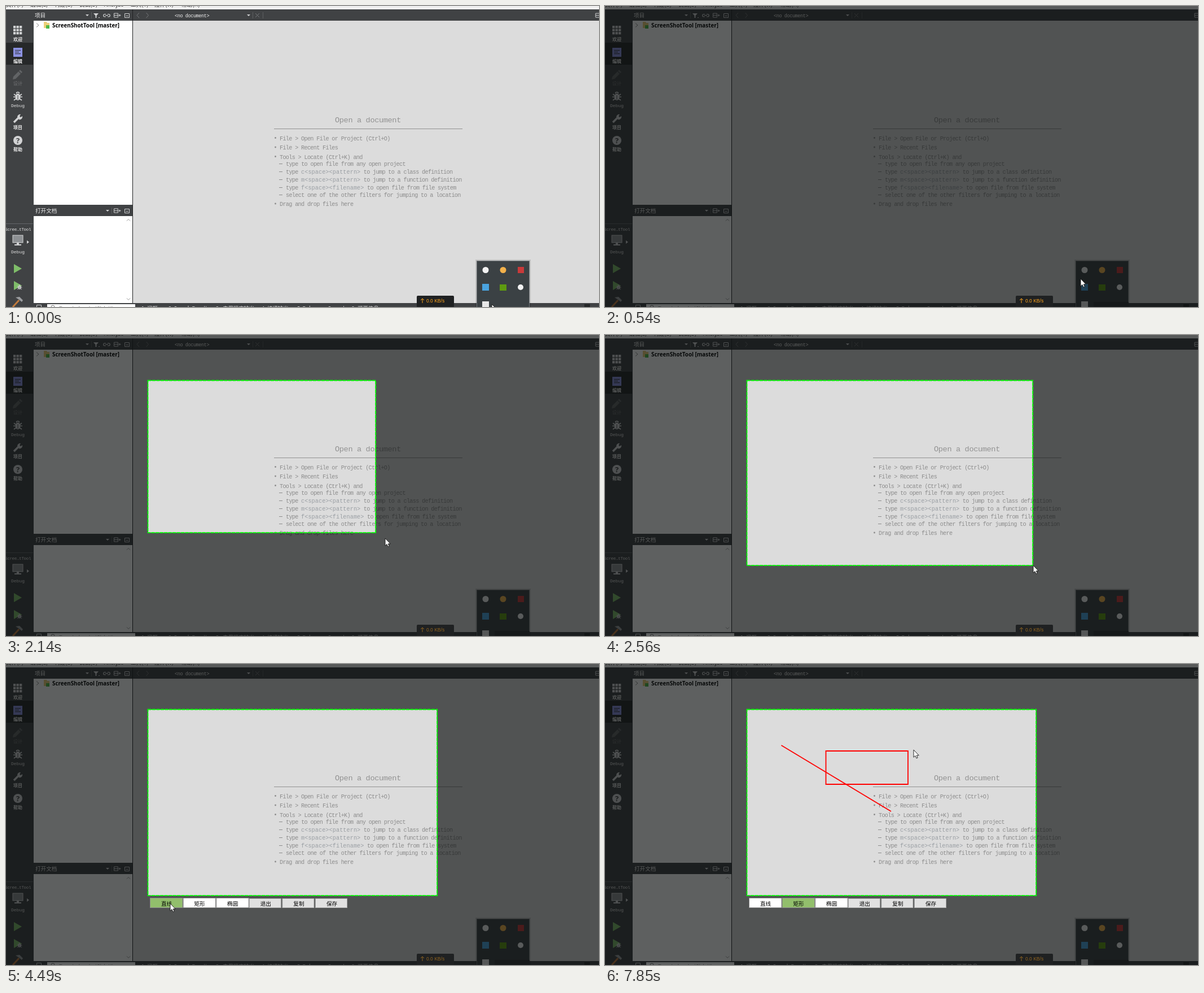
An HTML page for the animation above (8000 ms loop, 1051x533 px).

```html
<!DOCTYPE html>
<html lang="zh">
<head>
<meta charset="utf-8">
<title>Screenshot tool</title>
<style>
html, body { margin: 0; width: 100%; height: 100%; overflow: hidden; background: #dcdcdc; }
svg { display: block; }
text { white-space: pre; }
.cjk { font-family: "Noto Sans CJK SC", "Noto Sans CJK", "Noto Sans", sans-serif; }
.mono { font-family: "Liberation Mono", monospace; }
.bold { font-family: "Open Sans", sans-serif; font-weight: 700; }
.sans { font-family: "Liberation Sans", sans-serif; }
</style>
</head>
<body>
<svg id="stage" width="1051" height="533" viewBox="0 0 1051 533"></svg>
<script>
const LOOP = 8000, BAR = '#404244', LIGHT = '#d2d3d4';
const stage = document.getElementById('stage');

function add(tag, attrs, text, parent = stage) {
  const el = document.createElementNS('http://www.w3.org/2000/svg', tag);
  for (const key in attrs) el.setAttribute(key, attrs[key]);
  if (text !== undefined) el.textContent = text;
  return parent.appendChild(el);
}
const box = (x, y, width, height, fill, more) => add('rect', { x, y, width, height, fill, ...more });
const fillPath = (d, fill, more) => add('path', { d, fill, ...more });
const linePath = (d, stroke, width = 1) => add('path', { d, stroke, fill: 'none', 'stroke-width': width });
const dot = (cx, cy, r, fill) => add('circle', { cx, cy, r, fill });
const label = (x, y, text, size, fill, more) =>
  add('text', { x, y, 'font-size': size, fill, class: 'cjk', ...more }, text);
const mono = (x, y, text, size, advance, fill, more) =>
  label(x, y, text, size, fill, { class: 'mono', 'letter-spacing': advance - size * 0.6, ...more });
const centred = { 'text-anchor': 'middle' };

function splitIcon(x, y) {
  linePath(`M${x - 5} ${y - 3.5}h7v7h-7zM${x - 5} ${y}h7M${x + 3} ${y}h4M${x + 5} ${y - 2}v4`, LIGHT);
}
function closeIcon(x, y) {
  linePath(`M${x - 4} ${y - 3.5}h8v7h-8zM${x - 2} ${y + .5}h4`, LIGHT);
}
const dropArrow = (x, y) => fillPath(`M${x - 3} ${y - 1}h6l-3 3z`, LIGHT);
const separator = (x, y) => linePath(`M${x + .5} ${y}v11`, '#5c5e60');

function bug(x, y, s, fill) {
  const g = add('g', { transform: `translate(${x} ${y}) scale(${s})` });
  add('ellipse', { cx: 0, cy: 1, rx: 4.5, ry: 6, fill }, undefined, g);
  add('path', { d: 'M-7-4l4 3M7-4l-4 3M-8 1h16M-7 7l4-3M7 7l-4-3M-2.5-5a2.5 2.5 0 0 1 5 0', fill: 'none', stroke: fill, 'stroke-width': 1.6 }, undefined, g);
  add('path', { d: 'M0-2v8', stroke: BAR }, undefined, g);
}

function drawMenu() {
  box(0, 0, 1051, 6, '#f0f0f0');
  const items = [['文件(F)', 0], ['编辑(E)', 43], ['构建(B)', 86], ['调试(D)', 130],
    ['Analyze', 174], ['工具(T)', 221], ['控件(W)', 263], ['帮助(H)', 311]];
  for (const [text, x] of items) label(x, 1, text, 9.6, '#222');
}

function drawSidebar() {
  box(0, 6, 49, 527, BAR);
  box(0, 65, 48, 39, '#262829');
  for (let i = 0; i < 9; i++) box(13 + i % 3 * 5.5, 35 + Math.floor(i / 3) * 5.5, 4.3, 4.3, LIGHT);
  box(13, 74, 16, 16, '#8b91e0');
  linePath('M16 78.5h10M16 81.5h7M16 84.5h10', '#262829');
  fillPath('M12 130l1-5 9-9 4 4-9 9zM23 115l2-2 4 4-2 2z', '#626466');
  bug(21, 160, 1, LIGHT);
  linePath('M14 206l8-8', LIGHT, 3.5);
  fillPath('M20 196a5 5 0 0 1 6-4l-2 3 2 2 3-2a5 5 0 0 1-6 6z', LIGHT);
  dot(21, 238, 8, LIGHT);
  label(21, 243, '?', 13, BAR, { class: 'bold', ...centred });
  const names = [['欢迎', 59], ['编辑', 98], ['设计', 137], ['项目', 215], ['帮助', 254]];
  for (const [text, y] of names)
    label(21, y + 3, text, 8, y === 137 ? '#626466' : '#eee', { 'font-weight': 700, ...centred });
  for (const y of [179, 437.5]) mono(9, y, 'Debug', 8, 4.8, '#e4e4e4');
  linePath('M0 385.5h48', '#65676a');
  mono(-2, 397.5, 'Scree…tTool', 7.5, 4.2, '#e4e4e4');
  box(12, 406, 18, 13, '#8d9093', { stroke: LIGHT });
  fillPath('M19 419h4v3h4v2H15v-2h4z', LIGHT);
  fillPath('M37 415l4 3-4 3z', LIGHT);
  for (const y of [457, 487]) fillPath(`M14 ${y}v16l14-8z`, '#7fbd69');
  bug(24, 498, .55, LIGHT);
  linePath('M12 533l11-12', '#c07a3c', 3);
  fillPath('M17 516l7-1 6 6-2 3-5-4z', '#9b9da0');
}

function drawPanels() {
  box(49, 6, 1002, 20, BAR);
  box(49, 26, 175, 326, '#fff');
  box(49, 352, 175, 20, BAR);
  box(49, 372, 175, 154, '#fff');
  box(224, 6, 1, 520, '#202122');
  label(51, 20, '项目', 9.6, '#eee');
  label(52, 366, '打开文档', 9.6, '#eee');
  dropArrow(144, 16);
  separator(151, 11);
  fillPath('M155 13h9l-3.5 4v4h-2v-4z', LIGHT);
  linePath('M164 20.5h2', LIGHT);
  linePath('M177 14.5h-2a2.2 2.2 0 0 0 0 4.500h2M180 14.500h2a2.200 2.200 0 0 1 0 4.500h-2M176 16.700h5', LIGHT, 1.2);
  splitIcon(196.5, 16.5);
  closeIcon(214.500, 17);
  dropArrow(180, 362);
  separator(187, 357);
  splitIcon(196.5, 362.5);
  closeIcon(214.5, 363);
  linePath('M236 12l-4 4.500 4 4.500M248.500 12l4 4.500-4 4.500', '#75777a');
  mono(299, 19.5, '<no document>', 8.5, 4.7, '#f0f0f0');
  dropArrow(430, 16);
  separator(437, 11);
  linePath('M442 13l7 7M449 13l-7 7', '#75777a');
  separator(455, 11);
  splitIcon(1050, 16.5);

  linePath('M54 30.5l4 3.500-4 3.500', '#888');
  fillPath('M67 28h5l1 2h4v9H67z', '#ecd07a');
  box(71, 34, 6, 6, '#4fb848');
  label(82, 37.5, 'ScreenShotTool [master]', 9.8, '#000', { class: 'bold' });
  linePath('M214 380.500l3-3 3 3M214 517.500l3 3 3-3', '#999');
}

function drawHints() {
  const ink = '#8c8c8c', pale = '#9a9fa4';
  mono(583, 205.5, 'Open a document', 13.6, 7.8, '#929292');
  linePath('M475 217.5H809', '#929292');
  const line = (x, y, text) => mono(x, y + 3.5, text, 10.2, 5.44, ink);
  const bullets = [[234, 'File > Open File or Project (Ctrl+O)'], [250.500, 'File > Recent Files'],
    [267, 'Tools > Locate (Ctrl+K) and'], [350.5, 'Drag and drop files here']];
  for (const [y, text] of bullets) {
    dot(477.5, y - .5, 1.4, ink);
    line(485, y, text);
  }
  const items = [[279.5, 'type to open file from any open project'],
    [293, 'type ', 'c<space><pattern>', ' to jump to a class definition'],
    [307, 'type ', 'm<space><pattern>', ' to jump to a function definition'],
    [321, 'type ', 'f<space><filename>', ' to open file from file system'],
    [334, 'select one of the other filters for jumping to a location']];
  for (const [y, head, code, tail] of items) {
    linePath(`M484 ${Math.floor(y) + .5}h6`, ink);
    line(496, y, head);
    if (!code) continue;
    mono(523, y + 3.5, code, 10.2, 6.2, pale);
    line(523 + code.length * 6.2, y, tail);
  }
}

function drawBottom() {
  box(49, 526, 1002, 7, BAR);
  linePath('M54.500 534v-4.500h8V534', LIGHT);
  box(73, 528, 156, 5, '#fff');
  linePath('M80 533a3 3 0 0 1 6 0', '#777');
  label(94, 539, 'Type to locate (Ctrl+K)', 9.4, '#888');
  const tabs = [['1', 240], ['问题', 250], ['2  Search Results', 288], ['3', 372], ['应用程序输出', 384],
    ['4', 453], ['编译输出', 463], ['5  Debugger Console', 516], ['6', 612], ['概要信息', 623]];
  for (const [text, x] of tabs) label(x, 538.5, text, 9.4, '#eee');
  box(1025, 528, 10, 5, '#252728');
}

function drawTray() {
  box(832, 449, 98, 90, '#000', { opacity: .12 });
  box(834.5, 451.5, 93, 90, '#3b4144', { stroke: '#6f7477' });
  dot(850, 467.5, 5.5, '#f2f2f2');
  dot(881, 467.5, 5.5, '#f3b14b');
  box(907, 462, 11, 11, '#c93a3a');
  box(844, 492, 12, 12, '#4aa3df');
  box(875, 493, 12, 11, '#5e9a10');
  dot(912, 498, 5, '#f2f2f2');
  box(844, 523, 12, 11, '#e8e8e8');
}

drawMenu();
drawPanels();
drawSidebar();
drawHints();
drawBottom();
drawTray();

const shade = fillPath('', 'rgb(8,12,12)', { 'fill-opacity': .65, 'fill-rule': 'evenodd' });
const trayShade = box(866, 524, 62, 9, '#16191a');
box(728, 513, 66, 21, '#1f2122', { rx: 2 });
const speed = add('g', {});
add('path', { d: 'M738 526v-8M735 521l3-3 3 3', stroke: '#ffa51e', fill: 'none' }, undefined, speed);
add('text', { x: 745, y: 525, 'font-size': 8.5, fill: '#ffa51e', class: 'sans' }, '0.0 KB/s', speed);

const frameBase = linePath('', '#1fa81f');
const frameDash = linePath('', '#00ff00', 1.8);
frameDash.setAttribute('stroke-dasharray', '6 1.500');
const redLine = linePath('', '#ff0000', 1.8);
const redBox = linePath('', '#ff0000', 1.8);

const toolbar = add('g', {});
const buttons = ['直线', '矩形', '椭圆', '退出', '复制', '保存'].map((text, i) => {
  const tool = i < 3, x = 255.5 + i * 58.6;
  const face = add('rect', { x, y: tool ? 414.5 : 415.5, width: tool ? 57.5 : 56, height: tool ? 17 : 16,
    fill: tool ? '#fff' : '#e1e1e1', stroke: tool ? '#8c8c8c' : '#adadad' }, undefined, toolbar);
  add('text', { x: x + 29, y: 427.5, 'font-size': 9.6, class: 'cjk', ...centred }, text, toolbar);
  return face;
});
const cursor = fillPath('M0 0V13.200L3 10.500 5 15 7.200 14 5.300 9.800H9.300Z', '#fff', { stroke: '#111', 'stroke-width': .9 });

// Evenly spaced held poses between two times.
const spread = (from, to, points) => points.map((p, i) =>
  [Math.floor((from + (to - from) * i / (points.length - 1)) / 10) * 10, p]);
const sweep = (a, b, parts) => parts.map(k => a.map((v, i) => Math.round(v + (b[i] - v) * k)));
const held = (keys, t) => {
  let value = null;
  for (const [start, p] of keys) if (t >= start) value = p;
  return value;
};

const pointer = [
  [0, [861, 528]],
  ...spread(120, 270, [[848, 520], [845, 517]]),
  ...spread(540, 1480, sweep([843, 483], [252, 81], [0, .1, .28, .5, .72, .88, .97, 1])),
  ...spread(1600, 2560, [[290, 110], [395, 190], [530, 276], [605, 322], [672, 360], [722, 387], [750, 404], [759, 408]]),
  ...spread(2720, 3650, [[764, 410], [764, 410], ...sweep([764, 411], [292, 423], [.06, .25, .55, .83, .97, 1])]),
  ...spread(3770, 3930, [[292, 424], [291, 424]]),
  ...spread(4490, 5430, [[291, 424], ...sweep([291, 424], [313, 144], [.12, .4, .75, .96, 1]), [335, 158], [370, 179]]),
  ...spread(5550, 6490, [...sweep([313, 144], [507, 261], [.5, .7, .89, .98, 1]), ...sweep([507, 261], [362, 416], [.3, .75, 1])]),
  ...spread(6640, 7580, [[358, 422], [351, 429], [350, 430], [350, 429], [362, 400], [383, 300], [393, 226], [391, 213]]),
  ...spread(7730, 7850, [[490, 170], [547, 152]])
];
const corner = [
  ...spread(1600, 2560, [[275, 98], [370, 170], [507, 262], [585, 310], [655, 350], [710, 380], [745, 400], [758, 408]]),
  [2720, [764, 410]]
];
const lineEnd = [
  ...spread(5290, 5430, sweep([313, 144], [507, 261], [.08, .23])),
  ...spread(5550, 6080, sweep([313, 144], [507, 261], [.45, .66, .84, .96, 1]))
];
const boxEnd = spread(7730, 7850, [[460, 184], [537, 154]]);
const chosen = [[4490, 0], [7040, 1]];

const show = (el, on) => el.setAttribute('visibility', on ? 'visible' : 'hidden');
const rectPath = (x, y, p) => p ? `M${x} ${y}H${p[0]}V${p[1]}H${x}Z` : '';

function render(t) {
  const dim = t >= 540, end = held(corner, t), tip = held(lineEnd, t), tool = held(chosen, t);
  shade.setAttribute('d', dim ? 'M0 0H1051V533H0Z' + rectPath(251, 80, end) : '');
  show(trayShade, dim);
  speed.setAttribute('opacity', t >= 670 ? .5 : 1);
  const outline = rectPath(251.5, 80.5, end && end.map(v => v + .2));
  frameBase.setAttribute('d', outline);
  frameDash.setAttribute('d', outline);
  show(toolbar, t >= 2850);
  buttons.slice(0, 3).forEach((b, i) => b.setAttribute('fill', i === tool ? '#92bf6c' : '#fff'));
  redLine.setAttribute('d', tip ? `M312.500 144L${tip}` : '');
  redBox.setAttribute('d', rectPath(391.5, 213, held(boxEnd, t)));
  cursor.setAttribute('transform', `translate(${held(pointer, t)})`);
}

const start = performance.now();
function tick() {
  render((performance.now() - start) % LOOP);
  requestAnimationFrame(tick);
}
tick();
</script>
</body>
</html>
```
